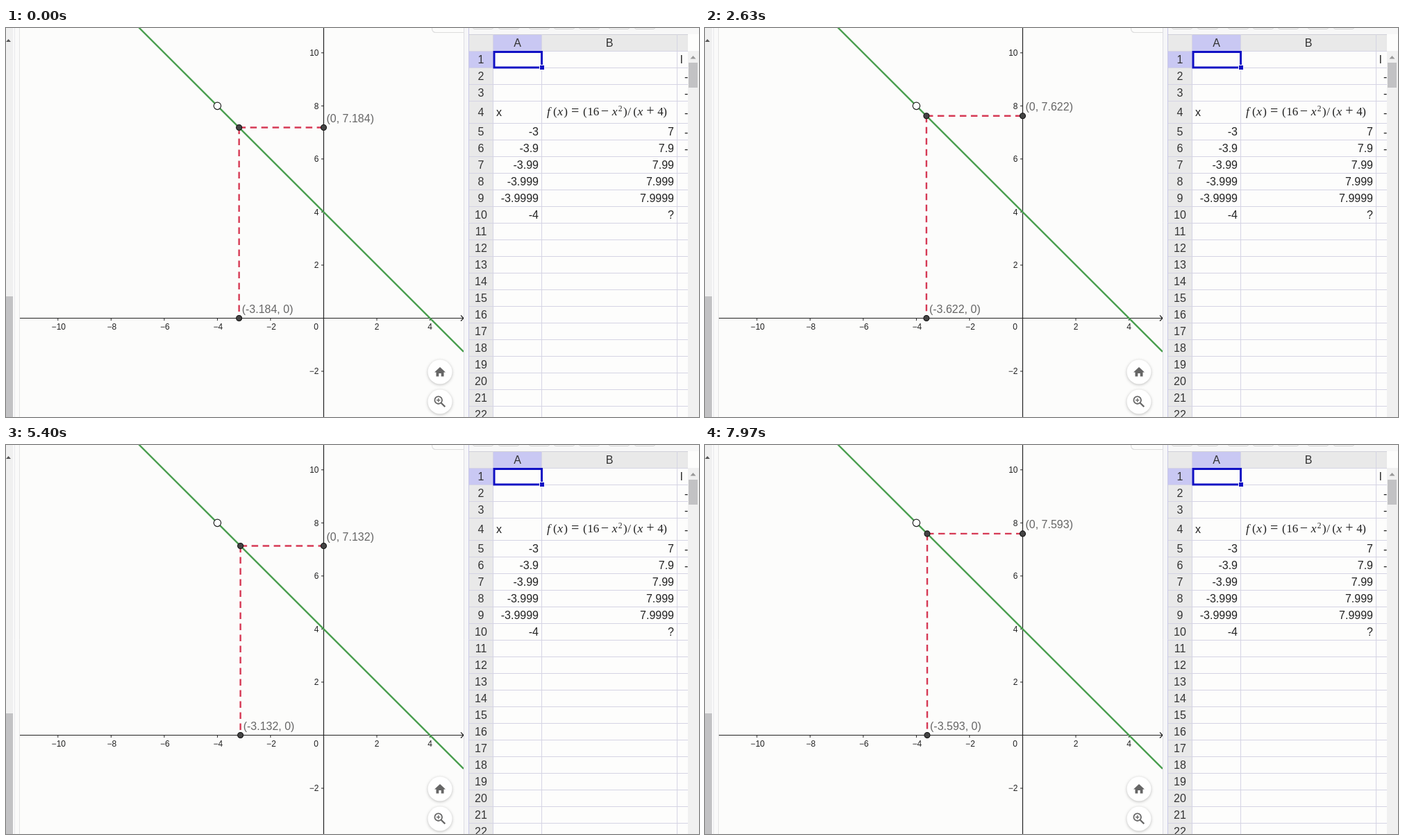
These frames come from a looping animation (998x561 px, 8000 ms). An HTML page with a canvas:

```html
<!DOCTYPE html>
<html lang="en">
<head>
<meta charset="utf-8">
<title>Limit of a function</title>
<style>
html, body { margin: 0; width: 100%; height: 100%; overflow: hidden; background: #fcfcfb; }
canvas { display: block; }
</style>
</head>
<body>
<canvas id="stage" width="998" height="561"></canvas>
<script>
const W = 998, H = 561, LOOP = 8000;
const ctx = document.getElementById('stage').getContext('2d');
const SANS = '"Liberation Sans", Arial, sans-serif';
const SERIF = '"Liberation Serif", "Times New Roman", serif';
const OX = 457.5, OY = 418.5, UNIT = 38.27;
const px = x => OX + x * UNIT;
const py = y => OY - y * UNIT;

// Distance travelled past x = -3 at given times; it wraps at x = -4
const PACE = [[0, .184], [1930, .499], [3230, .727], [4530, .953], [5400, 1.132], [6500, 1.313], [7970, 1.593], [8000, 1.5987]];

function sliderAt(t) {
  let i = 1;
  while (i < PACE.length - 1 && t > PACE[i][0]) i++;
  const [t0, d0] = PACE[i - 1], [t1, d1] = PACE[i];
  const d = d0 + (d1 - d0) * (t - t0) / (t1 - t0);
  return -3 - d % 1;
}

function box(c, x, y, w, h, color) {
  c.fillStyle = color;
  c.fillRect(x, y, w, h);
}

function line(c, x0, y0, x1, y1, color, width = 1) {
  c.strokeStyle = color;
  c.lineWidth = width;
  c.beginPath();
  c.moveTo(x0, y0);
  c.lineTo(x1, y1);
  c.stroke();
}

function text(c, s, x, y, size, color, align = 'left', style = '', family = SANS) {
  c.font = `${style} ${size}px ${family}`;
  c.fillStyle = color;
  c.textAlign = align;
  c.fillText(s, x, y);
}

function shape(c, points, color) {
  c.fillStyle = color;
  c.beginPath();
  points.forEach(([x, y]) => c.lineTo(x, y));
  c.fill();
}

function dot(c, x, y, r, fill, stroke, width = 1) {
  c.beginPath();
  c.arc(x, y, r, 0, Math.PI * 2);
  c.fillStyle = fill;
  c.fill();
  c.strokeStyle = stroke;
  c.lineWidth = width;
  c.stroke();
}

function drawLeftBar(c) {
  box(c, 0, 0, 10, H, '#f0f0f0');
  box(c, 10, 0, 9, H, '#fafafa');
  box(c, 0, 387, 10, H - 387, '#c2c2c4');
  shape(c, [[0, 20], [7, 20], [3.5, 16]], '#555');
  line(c, 12.5, 0, 12.5, H, '#e9e9ec');
  line(c, 19.5, 0, 19.5, H, '#e4e4e4');
}

function drawAxes(c) {
  const ink = '#222';
  line(c, 20, OY, 659, OY, ink, 1.2);
  line(c, OX, 0, OX, H, ink, 1.2);
  c.strokeStyle = ink;
  c.beginPath();
  c.moveTo(655, OY - 4);
  c.lineTo(659, OY);
  c.lineTo(655, OY + 4);
  c.stroke();
  const label = n => String(n).replace('-', '\u2212');
  for (let n = -10; n <= 4; n += 2) {
    if (!n) continue;
    line(c, px(n), OY, px(n), OY + 3.5, ink);
    text(c, label(n), px(n) + (n < 0 ? 1 : 0), 434.5, 12, ink, 'center');
  }
  for (let n = -2; n <= 10; n += 2) {
    if (!n) continue;
    line(c, OX - 3.5, py(n), OX, py(n), ink);
    text(c, label(n), 450.5, py(n) + 4.3, 12, ink, 'right');
  }
  text(c, '0', 450, 434.5, 12, ink, 'right');
}

function drawButtons(c) {
  c.strokeStyle = '#dcdcdc';
  c.lineWidth = 1.2;
  c.beginPath();
  c.moveTo(613.5, 0);
  c.quadraticCurveTo(613.5, 6.5, 619, 6.5);
  c.lineTo(659, 6.5);
  c.stroke();

  for (const y of [496, 539]) {
    c.save();
    c.shadowColor = 'rgba(0,0,0,.25)';
    c.shadowBlur = 4;
    c.shadowOffsetY = 1;
    c.fillStyle = '#fff';
    c.beginPath();
    c.arc(625, y, 17.5, 0, Math.PI * 2);
    c.fill();
    c.restore();
  }
  const gray = '#666';
  shape(c, [[617, 496.5], [625, 489], [633, 496.5], [630.5, 496.5], [630.5, 502.5],
    [626.7, 502.5], [626.7, 498], [623.3, 498], [623.3, 502.5], [619.5, 502.5], [619.5, 496.5]], gray);
  dot(c, 622.7, 536.7, 5.3, '#fff', gray, 1.8);
  line(c, 626.7, 540.7, 632.3, 546.3, gray, 2.3);
  line(c, 620, 536.7, 625.4, 536.7, gray, 1.3);
  line(c, 622.7, 534, 622.7, 539.4, gray, 1.3);
}

// Math tokens with their em advances and style
function drawFormula(c, x, y) {
  const em = 16;
  const tokens = [['f', .56, 1], ['(', .39], ['x', .57, 1], [')', .39], ['=', 1.333, 0, .278],
    ['(', .39], ['16', 1], ['\u2212', 1.222, 0, .222], ['x', .57, 1], ['2', .45, 2], [')', .39],
    ['/', .5], ['(', .39], ['x', .57, 1], ['+', 1.222, 0, .222], ['4', .5], [')', .39]];
  for (const [s, advance, kind = 0, pad = 0] of tokens) {
    const sup = kind === 2;
    const size = sup ? 11.5 : kind === 1 ? 17.5 : '=+\u2212'.includes(s) ? 20 : 17;
    text(c, s, x + pad * em, y - (sup ? 6 : 0), size, '#222', 'left', kind === 1 ? 'italic' : '', SERIF);
    x += advance * em;
  }
}

function drawSheet(c) {
  const rowTop = n => n < 5 ? 33.5 + 24 * (n - 1) : 137.5 + 24 * (n - 5);
  const rowMid = n => n === 4 ? 121.5 : rowTop(n) + 12;
  const ink = '#333', grid = '#d5d4e4', head = '#e9e9e9', pick = '#c9c8f3';

  box(c, 659, 0, 8, H, '#f6f6f8');
  line(c, 659.5, 0, 659.5, H, '#dedee4');
  line(c, 666.5, 0, 666.5, H, '#c9c8e6');
  box(c, 667, 0, 331, H, '#fdfdfc');
  box(c, 667, 0, 331, 9, '#f7f7f7');
  for (const x of [672, 709, 753, 789, 825, 868, 905]) {
    c.strokeStyle = '#d2d2d2';
    c.lineWidth = 1;
    c.beginPath();
    c.moveTo(x, -2);
    c.quadraticCurveTo(x, 1.5, x + 3, 1.5);
    c.lineTo(x + 27, 1.5);
    c.quadraticCurveTo(x + 30, 1.5, x + 30, -2);
    c.stroke();
  }

  box(c, 667, 9, 315, 24, head);
  box(c, 667, 33, 35, H - 33, head);
  box(c, 702, 9, 70, 24, pick);
  box(c, 667, 33, 35, 24, pick);
  line(c, 667, 9.5, 982, 9.5, '#d0d0d8');
  for (let n = 1; n <= 22; n++) line(c, 667, rowTop(n), 982, rowTop(n), grid);
  for (const x of [701.5, 771.5, 966.5]) line(c, x, 9, x, H, grid);

  text(c, 'A', 736.5, 26.5, 16, ink, 'center');
  text(c, 'B', 869, 26.5, 16, ink, 'center');
  for (let n = 1; n <= 22; n++) text(c, n, 684, rowMid(n) + 5.5, 16, ink, 'center');

  const xs = ['-3', '-3.9', '-3.99', '-3.999', '-3.9999', '-4'];
  const ys = ['7', '7.9', '7.99', '7.999', '7.9999', '?'];
  xs.forEach((s, i) => {
    const y = rowMid(i + 5) + 5.5;
    text(c, s, 767, y, 16, '#222', 'right');
    text(c, ys[i], 962, y, 16, '#222', 'right');
  });
  text(c, 'x', 706, 127, 16, '#222');
  drawFormula(c, 779, 125.5);

  // Clipped contents of the next column
  c.save();
  c.beginPath();
  c.rect(967, 33, 15, H);
  c.clip();
  text(c, 'l', 971, 50.5, 16, '#222');
  for (const n of [2, 3, 4, 5, 6]) text(c, '-', 977, rowMid(n) + 6, 16, '#222');
  c.restore();

  box(c, 982, 33, 16, H - 33, '#f0f0f0');
  box(c, 983, 50, 13, 36, '#c2c2c4');
  shape(c, [[985.5, 44.5], [993.5, 44.5], [989.5, 40]], '#999');

  c.strokeStyle = '#1010c4';
  c.lineWidth = 3;
  c.strokeRect(703, 34.5, 68.5, 22.5);
  box(c, 768, 53, 8, 8, '#fdfdfc');
  box(c, 769, 54, 6, 6, '#1010c4');
}

function makeBackdrop() {
  const layer = document.createElement('canvas');
  layer.width = W;
  layer.height = H;
  const c = layer.getContext('2d');
  box(c, 0, 0, W, H, '#fcfcfb');
  drawLeftBar(c);
  drawAxes(c);
  line(c, px(-7.2), py(11.2), 659, py(4 - (659 - OX) / UNIT), '#4a9e4f', 2.4);
  drawButtons(c);
  drawSheet(c);
  return layer;
}

function dashed(x0, y0, x1, y1) {
  ctx.setLineDash([9.5, 6.5]);
  line(ctx, x0, y0, x1, y1, '#d63a55', 2.4);
  ctx.setLineDash([]);
}

const backdrop = makeBackdrop();

function draw(t) {
  const x = sliderAt(t), y = 4 - x;
  const X = px(x), Y = py(y);
  ctx.drawImage(backdrop, 0, 0);
  dashed(X, Y, X, OY);
  dashed(X, Y, OX, Y);
  for (const [a, b] of [[X, Y], [X, OY], [OX, Y]]) dot(ctx, a, b, 4, '#444', '#111', 1.1);
  dot(ctx, px(-4), py(8), 5.2, '#fff', '#222', 1.2);
  text(ctx, `(${x.toFixed(3)}, 0)`, X + 4, OY - 8, 16, '#666');
  text(ctx, `(0, ${y.toFixed(3)})`, OX + 4, Y - 8, 16, '#666');
}

let start;
function tick(now) {
  start ??= now;
  draw((now - start) % LOOP);
  requestAnimationFrame(tick);
}
draw(0);
requestAnimationFrame(tick);
</script>
</body>
</html>
```
